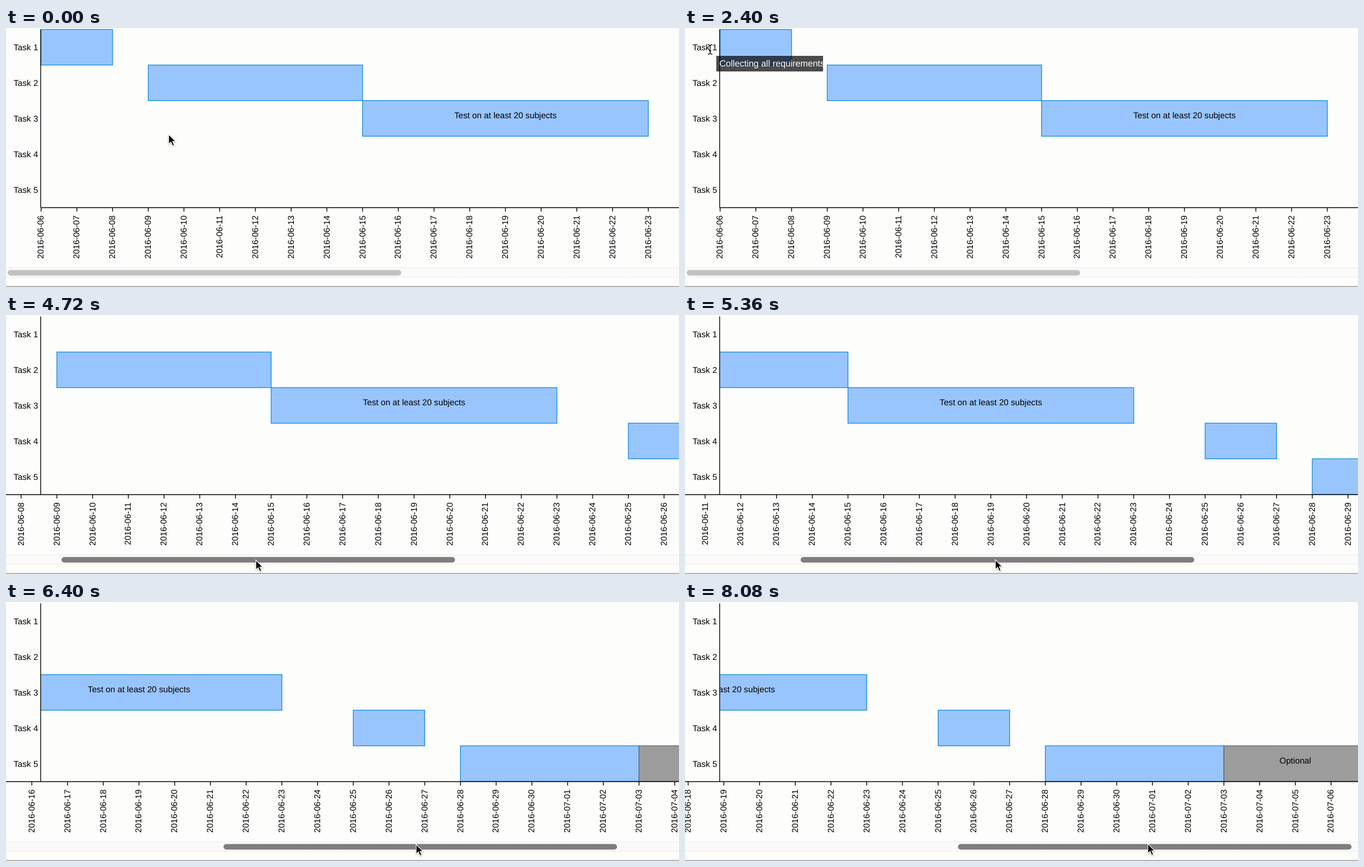
Animation of 1204x465 px, one loop 8160 ms. Source, as an HTML page:

```html
<!DOCTYPE html>
<html lang="en">
<head>
<meta charset="utf-8">
<title>Task timeline</title>
<style>
html, body { margin: 0; width: 100%; height: 100%; overflow: hidden; background: #fdfdfc; }
svg { display: block; }
text { font: 15.2px "Liberation Sans", Arial, sans-serif; text-rendering: geometricPrecision; }
.axis { stroke: #000; stroke-width: 1.4; fill: none; }
</style>
</head>
<body>
<svg id="stage" width="1204" height="465" viewBox="0 0 1204 465">
  <defs>
    <clipPath id="plot"><rect x="62" width="1142" height="323"/></clipPath>
    <pattern id="hatch" width="3" height="3" patternUnits="userSpaceOnUse">
      <rect width="3" height="3" fill="#a0a0a0"/>
      <path d="M-1 1L1 -1M0 3L3 0M2 4L4 2" stroke="#929292" stroke-width=".8"/>
    </pattern>
  </defs>
  <g id="labels" text-anchor="end"></g>
  <g clip-path="url(#plot)"><g id="bars" text-anchor="middle"></g></g>
  <g id="dates" text-anchor="end"></g>
  <path class="axis" d="M62 2.5V322.5"/>
  <rect y="430" width="1204" height="17" fill="#fafafa"/>
  <path d="M0 430.5H1204M0 447.5H1204" stroke="#e6e6e6" stroke-dasharray="2 1"/>
  <rect id="thumb" y="434.5" width="704" height="10" rx="5"/>
  <rect y="463.5" width="1204" height="1.2" fill="#858585"/>
  <g id="tip">
    <rect width="191" height="28" fill="#000" fill-opacity=".7"/>
    <text x="5.5" y="19.3" fill="#fff" style="font-size:16px">Collecting all requirements</text>
  </g>
  <path id="beam" d="M-4 -8Q0 -8 0 -5Q0 -8 4 -8M0 -6V6M-4 9Q0 9 0 6Q0 9 4 9M-2 3H2" fill="none" stroke="#111" stroke-width="1.4"/>
  <path id="arrow" d="M0 0V17.5L4 13.8L7 20.5L10 19.2L7.1 12.6H12.4Z" fill="#000" stroke="#fff" stroke-width="1.2"
    style="filter:drop-shadow(0 1px 1px rgba(0,0,0,.35))"/>
</svg>
<script>
const LOOP = 8160, STEP = 80, DAY = 63.9, LEFT = 62.8, TOP = 2.6;
const $ = id => document.getElementById(id);

function add(parent, tag, attrs, content) {
  const el = document.createElementNS("http://www.w3.org/2000/svg", tag);
  for (const key in attrs) el.setAttribute(key, attrs[key]);
  if (content) el.textContent = content;
  $(parent).append(el);
}

const dayX = day => LEFT + day * DAY;
const rowY = row => TOP + row * DAY;

function bar(row, from, to, caption, fill = "#99c5ff", stroke = "#1b8fd6") {
  add("bars", "rect", { x: dayX(from), y: rowY(row), width: (to - from) * DAY, height: DAY, fill, stroke, "stroke-width": 1.4 });
  if (caption) add("bars", "text", { x: dayX((from + to) / 2), y: rowY(row) + 31.9 }, caption);
}

for (let i = 0; i < 5; i++) add("labels", "text", { x: 57.4, y: rowY(i) + 37.6 }, "Task " + (i + 1));

bar(0, 0, 2);
bar(1, 3, 9);
bar(2, 9, 17, "Test on at least 20 subjects");
bar(3, 19, 21);
bar(4, 22, 27);
bar(4, 27, 31, "Optional", "url(#hatch)", "#666");

add("dates", "path", { class: "axis", d: "M62 322.5H2100" });
for (let day = 0; day < 32; day++) {
  const x = dayX(day), date = new Date(Date.UTC(2016, 5, 6 + day)).toISOString().slice(0, 10);
  add("dates", "path", { class: "axis", d: `M${x} 322.5V329.5` });
  add("dates", "text", { transform: `translate(${x + 4.6} 336.5) rotate(-90)` }, date);
}

// time, pointer x, pointer y, scroll offset
const keys = [
  [0, 291, 191, 0],
  [880, 45, 38, 0],
  [2640, 45, 38, 0],
  [3520, 342, 431, 0],
  [3840, 343, 433, 0],
  [4720, 447, 440, 163.5],
  [5920, 654, 438, 517.5],
  [6960, 806, 432, 783],
  [7360, 828, 434, 824],
  [LOOP, 828, 434, 824]
];

const slope = (i, k) => (keys[i + 1][k] - keys[i][k]) / (keys[i + 1][0] - keys[i][0]);

function tangent(i, k) {
  if (i === 0 || i === keys.length - 1) return 0;
  const a = slope(i - 1, k), b = slope(i, k);
  return a * b > 0 ? 2 * a * b / (a + b) : 0;
}

// Monotone cubic through the keys
function value(t, k) {
  let i = 0;
  while (t >= keys[i + 1][0]) i++;
  const a = keys[i], b = keys[i + 1], d = b[0] - a[0], u = (t - a[0]) / d, v = 1 - u;
  return a[k] * v * v * (1 + 2 * u) + b[k] * u * u * (3 - 2 * u)
    + d * u * v * (tangent(i, k) * v - tangent(i + 1, k) * u);
}

const move = (id, x, y) => $(id).setAttribute("transform", `translate(${x} ${y})`);
const show = (id, on) => $(id).setAttribute("visibility", on ? "visible" : "hidden");

function draw(t) {
  const x = value(t, 1), y = value(t, 2), scroll = value(t, 3);
  const onLabel = x < 58 && y < 46;
  move("bars", -scroll, 0);
  move("dates", -scroll, 0);
  $("thumb").setAttribute("x", 3 + scroll * 0.589);
  $("thumb").setAttribute("fill", t >= 3600 ? "#7d7d7d" : "#c1c1c1");
  move("tip", x + 11, y + 12);
  move("beam", x, y);
  move("arrow", x, y);
  show("tip", onLabel);
  show("beam", onLabel);
  show("arrow", !onLabel);
}

const start = performance.now();
function tick() {
  const t = (performance.now() - start) % LOOP;
  draw(Math.floor(t / STEP) * STEP);
  requestAnimationFrame(tick);
}
tick();
</script>
</body>
</html>
```
